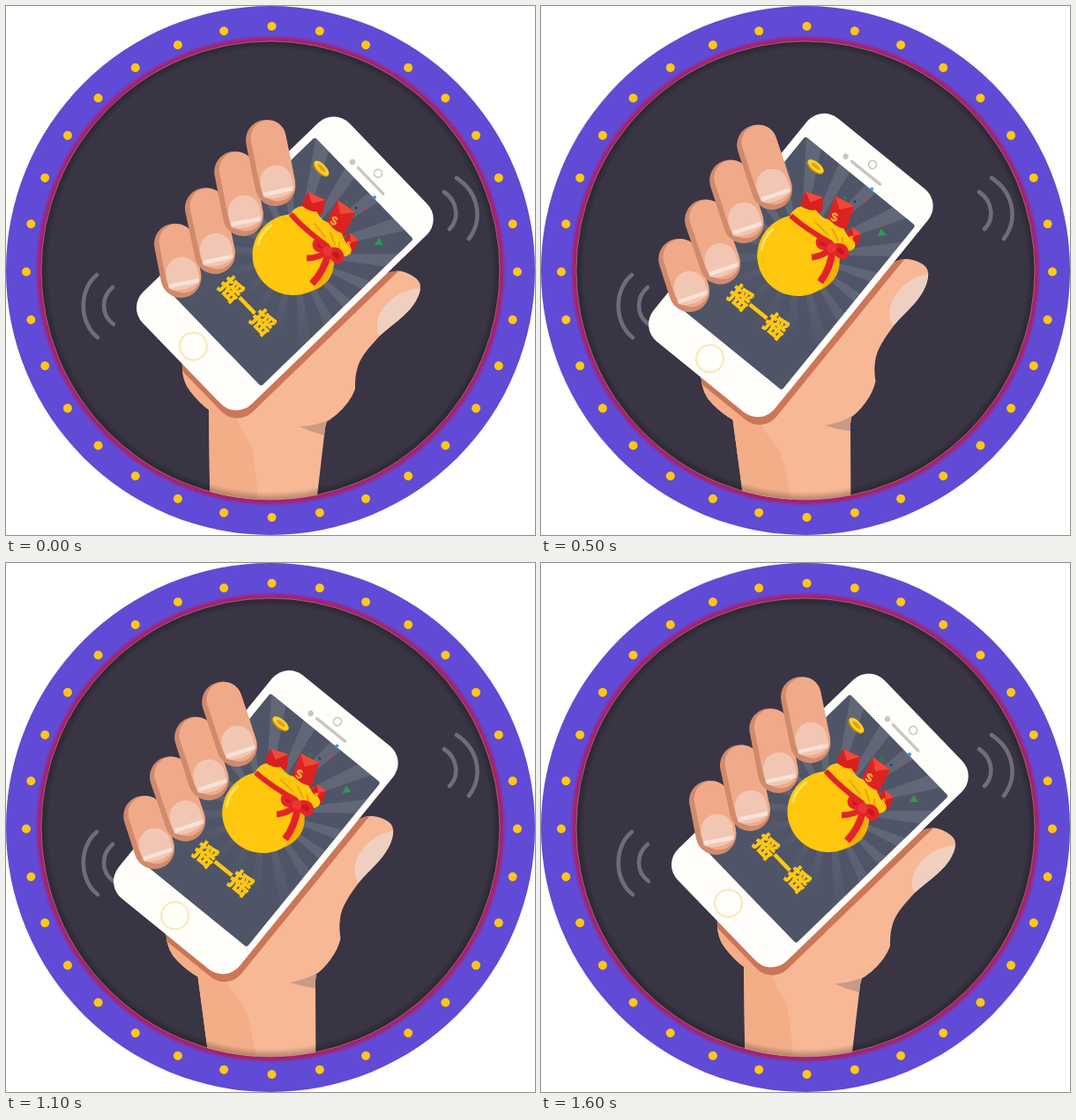
An HTML page that plays this animation: 600x600 px, repeating every 4.6 s.

```html
<!DOCTYPE html>
<html lang="zh">
<head>
<meta charset="utf-8">
<style>
html, body { margin: 0; width: 100%; height: 100%; overflow: hidden; background: #fff; }
svg { display: block; width: 100vw; height: 100vh; }
text { font-weight: 900; text-anchor: middle; }
</style>
</head>
<body>
<svg viewBox="0 0 600 600">
  <defs>
    <radialGradient id="glow" gradientUnits="userSpaceOnUse" cx="300" cy="300" r="267">
      <stop offset=".974" stop-color="#b01c5c"/>
      <stop offset=".985" stop-color="#a02478"/>
      <stop offset="1" stop-color="#614ad5"/>
    </radialGradient>
    <radialGradient id="rim" gradientUnits="userSpaceOnUse" cx="300" cy="300" r="260">
      <stop offset=".965" stop-color="#000" stop-opacity="0"/>
      <stop offset="1" stop-color="#000" stop-opacity=".28"/>
    </radialGradient>
    <linearGradient id="ray" gradientUnits="userSpaceOnUse" x1="0" y1="-125" x2="0" y2="60">
      <stop offset="0" stop-color="#fff" stop-opacity=".11"/>
      <stop offset=".6" stop-color="#fff" stop-opacity=".1"/>
      <stop offset="1" stop-color="#fff" stop-opacity="0"/>
    </linearGradient>
    <clipPath id="disc"><circle cx="300" cy="300" r="260"/></clipPath>
    <clipPath id="glass"><rect x="-80" y="-125" width="161" height="240.500" rx="3"/></clipPath>
    <path id="palm" d="M200 405Q199 425 209 437Q219 450 230 458L232 620H345L353 555L362 478L364 471C374 466 391 450 396 434C396 426 396 420 398 413C401 398 413 386 425 373C438 361 453 352 462 339Q469 329 470 320Q471 312 461 306Q446 296 430 304L300 320Z"/>
    <clipPath id="inPalm"><use href="#palm"/></clipPath>
  </defs>

  <circle cx="300" cy="300" r="300" fill="#614ad5"/>
  <circle cx="300" cy="300" r="267" fill="url(#glow)"/>
  <g id="dots" fill="#ffc80f"></g>
  <circle cx="300" cy="300" r="260" fill="#393544"/>

  <g clip-path="url(#disc)">
    <g id="hand">
      <use href="#palm" fill="#f8b896"/>
      <g clip-path="url(#inPalm)">
        <path d="M195 400L262 468Q268 484 278 498Q286 525 287 620H220Z" fill="#f3ae88"/>
        <path d="M333 477Q352 476 368 469L362 487Q348 484 333 477Z" fill="#c99a84"/>
        <path d="M474 321C456 318 430 332 422 354Q419 370 424 374L440 382L485 340Z" fill="#efd0c0"/>
        <rect x="-89" y="-163" width="177" height="325" rx="25" fill="#cb7657" transform="translate(317 302) rotate(46)"/>
      </g>

      <g transform="translate(316 293) rotate(46)">
        <rect x="-89" y="-164" width="177" height="326" rx="25" fill="#fffefa"/>
        <g clip-path="url(#glass)">
          <rect x="-81" y="-126" width="164" height="244" fill="#4f5567"/>
          <path id="rays" fill="url(#ray)"/>
        </g>
        <circle cx="-5" cy="139" r="15.500" fill="none" stroke="#f8e8b4" stroke-width="2"/>
        <circle cx="-.5" cy="-148" r="4.500" fill="none" stroke="#c8c5c2" stroke-width="1.600"/>
        <circle cx="-30" cy="-136" r="3.200" fill="#c8c5c2"/>
        <path d="M-21 -136H20" stroke="#c8c5c2" stroke-width="3.400" stroke-linecap="round"/>
        <text x="4" y="73" font-size="26" font-family="'Noto Sans CJK SC','Noto Sans CJK',sans-serif" fill="#ffc814" stroke="#ffc814" stroke-width="1.100">摇一摇</text>
      </g>

      <g transform="translate(358 184) rotate(46)">
        <ellipse cy="1.500" rx="11" ry="5" fill="#c98d08"/>
        <ellipse rx="11" ry="4.800" fill="#fbd02c"/>
        <ellipse rx="6" ry="2.200" fill="#e0a510"/>
      </g>

      <path d="M335 224L343 211L362 220L359 236L346 238Z" fill="#d8201f"/>
      <path d="M343 211L362 220L347 224Z" fill="#f04a3c"/>
      <path d="M376 220L396 234L383 261L362 248Z" fill="#dd2222"/>
      <path d="M376 220L396 234L379 236Z" fill="#f0483a"/>
      <path d="M381 267L390 257L400 266L394 279L384 278Z" fill="#d8201f"/>
      <path d="M390 257L400 266L391 268Z" fill="#f0483a"/>
      <g fill="#fbc630" font-family="'Liberation Sans',Arial,sans-serif">
        <text font-size="14" transform="translate(370 248) rotate(25)">$</text>
        <text font-size="9" transform="translate(387 273) rotate(25)">$</text>
      </g>

      <path d="M322 237Q326 228 336 227Q345 234 352 233Q358 244 366 246Q372 255 381 258Q383 267 391 274Q394 282 384 284Q376 286 371 292L340 280Z" fill="#ffc70d"/>
      <ellipse cx="326" cy="282" rx="46.500" ry="46" fill="#ffc70d"/>
      <path d="M372 286Q374 314 346 324Q362 305 355 290Z" fill="#f4ae05"/>
      <path d="M286 270Q290 256 301 249" fill="none" stroke="#ffe163" stroke-width="3" stroke-linecap="round"/>
      <path d="M350 247L362 262M368 257L373 271M378 268L378 277" stroke="#eda40a" stroke-width="2" stroke-linecap="round"/>
      <g fill="none" stroke="#e3232a" stroke-linecap="round">
        <path d="M323 236Q339 254 364 272L374 288" stroke-width="6" stroke-linecap="butt"/>
        <path d="M364 279Q354 286 341 286" stroke-width="7" stroke-linecap="butt"/>
        <path d="M365 282Q361 300 347 315" stroke-width="8" stroke-linecap="butt"/>
        <path d="M364 277Q352 260 350 270Q350 279 364 277Q379 273 381 284Q378 297 366 281" fill="#c9161d" stroke-width="5"/>
      </g>
      <circle cx="365" cy="278" r="5.500" fill="#ec3338"/>

      <path d="M423 263L428 271L418 271Z" fill="#2f9a52"/>
      <path d="M386 220L390 225L384 225Z" fill="#2c7a4c"/>
      <circle cx="418" cy="217" r="2" fill="#2f9be0"/>
      <circle cx="409" cy="229" r="1.500" fill="#e03a3a"/>
      <circle cx="397" cy="229" r="1.500" fill="#303c68"/>
      <g id="fingers"></g>
    </g>
  </g>

  <g fill="none" stroke="#fff" stroke-opacity=".28" stroke-width="4.600" stroke-linecap="round">
    <path d="M511 195C537 212 541 243 525 264"/>
    <path d="M497 211C513 222 514 242 503 253"/>
    <path d="M103 305C82 322 83 360 104 376"/>
    <path d="M121 319C108 330 107 350 122 361"/>
  </g>
  <circle cx="300" cy="300" r="260" fill="url(#rim)"/>
  <circle cx="300" cy="300" r="260" fill="none" stroke="#d9a3c4" stroke-opacity=".5"/>
</svg>
<script>
const $ = id => document.getElementById(id);
const repeat = (n, make) => Array.from({ length: n }, (_, i) => make(i)).join('');

$('dots').innerHTML = repeat(32, i =>
  `<circle cx="301.500" cy="23" r="5" transform="rotate(${i * 11.25} 301.5 301.5)"/>`);

const polar = deg => {
  const a = deg * Math.PI / 180;
  return `${240 * Math.sin(a)} ${-17 - 240 * Math.cos(a)}`;
};
$('rays').setAttribute('d', repeat(18, i =>
  `M0 -17L${polar(i * 20 + 4)}L${polar(i * 20 + 12)}Z`));

// Tip centre, length of the straight part, tilt
const finger = ([x, y, len, tilt]) => `<g transform="translate(${x} ${y}) rotate(${tilt})">
  <rect x="-23" y="${-len - 23}" width="46" height="${len + 46}" rx="23" fill="#d08a6c"/>
  <rect x="-17" y="${-len - 22}" width="40" height="${len + 40}" rx="20" fill="#f0aa8a"/>
  <path d="M-16 9V-5A18 18 0 0 1 20 -5V6Q16 13 2 14Q-12 14 -16 9Z" fill="#f1c7b3"/>
  <path d="M-15 7H19" stroke="#f8e2d8" stroke-width="4.500"/></g>`;
$('fingers').innerHTML = [
  [198.5, 308, 39, -11], [237, 281, 53, -12], [269, 238, 51, -11], [305.5, 204, 53, -11.5]
].map(finger).join('');

const right = 'rotate(0)', middle = 'rotate(-6.9 317 567)', left = 'rotate(-15.5 293 573)';
const shake = [right, middle, left, middle];

function draw() {
  const step = Math.min(16, Math.floor(performance.now() % 4600 / 100));
  $('hand').setAttribute('transform', shake[step % 4]);
  requestAnimationFrame(draw);
}
draw();
</script>
</body>
</html>
```
